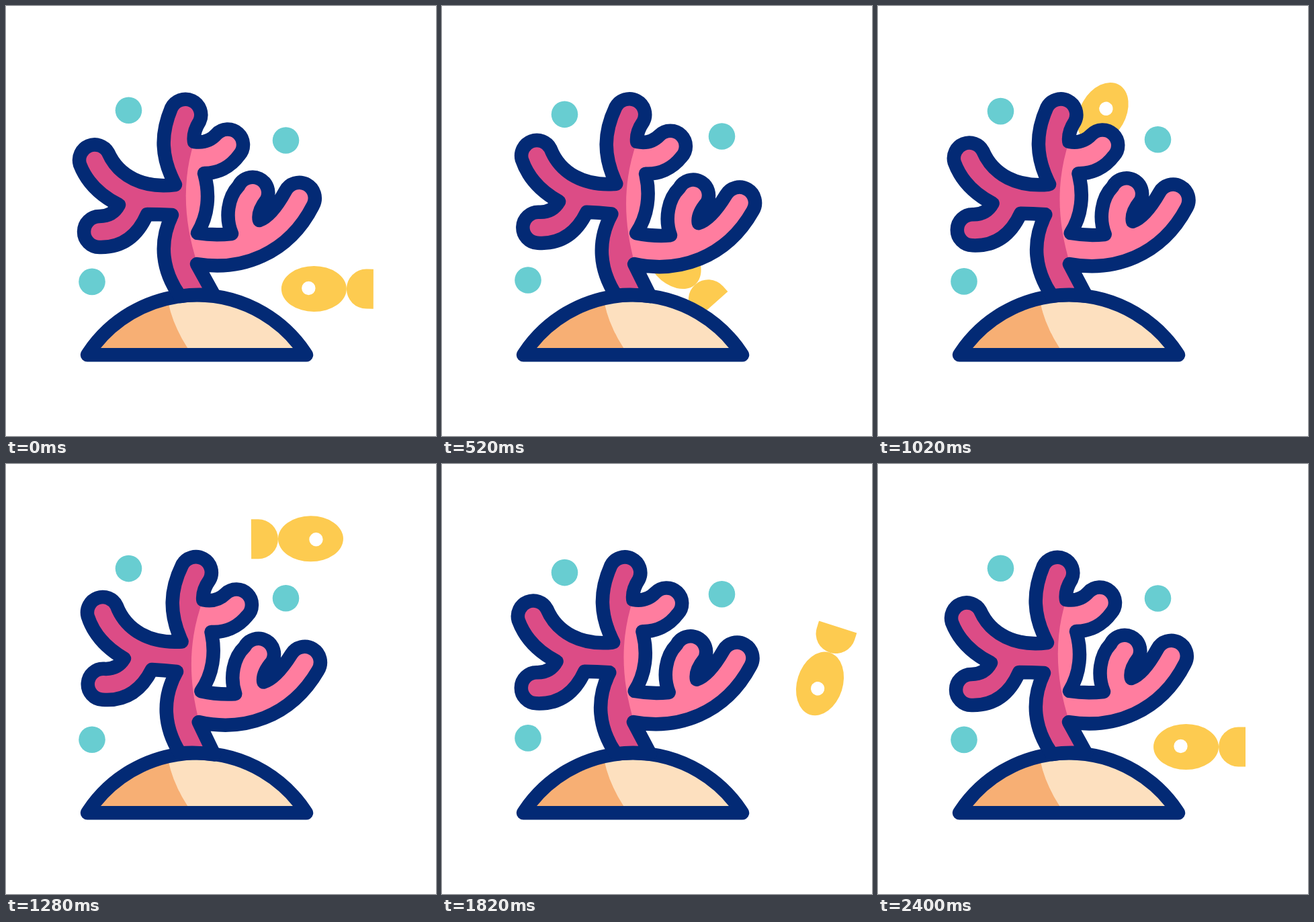
An HTML page for the animation above (2420 ms loop, 640 by 640 pixels).

```html
<!DOCTYPE html>
<html lang="en">
<head>
<meta charset="utf-8">
<title>Coral reef</title>
<style>
  html, body { margin: 0; width: 100%; height: 100%; overflow: hidden; background: #fff; }
  svg { display: block; width: 100vw; height: 100vh; }
  .line { fill: none; stroke: #032a75; stroke-width: 20.5; stroke-linejoin: round; stroke-linecap: round; }
</style>
</head>
<body>
<svg viewBox="0 0 640 640">
  <defs>
    <path id="coralShape" d="M259 432
      C232 394 227 352 247 311 Q228 310 210 310
      C197 340 175 360 139 359 A23 23 0 0 1 139 313 Q159 313 168 296
      C140 282 120 262 110 236 A23 23 0 0 1 152 218
      C168 254 205 272 252 266
      C230 225 230 190 246 152 A23 23 0 0 1 288 172 Q278 188 280 202
      C293 204 304 201 313 191 A23 23 0 0 1 347 222
      C334 240 315 249 295 249
      C304 280 301 312 285 338 Q310 342 336 339
      C326 315 330 285 346 268 A23 23 0 0 1 388 288 Q374 306 377 319
      C392 314 405 295 416 275 A23 23 0 0 1 457 297
      C420 370 350 395 284 384 L310 431
      A194 194 0 0 0 259 432 Z"/>
    <path id="duneShape" d="M121 519.3 A193.8 193.8 0 0 1 447 519.3 Z"/>
    <clipPath id="coralShade">
      <path d="M280 202 L310 150 V100 H80 V445 H330 L285 384 C264 320 262 260 280 202 Z"/>
    </clipPath>
    <clipPath id="duneShade">
      <path d="M239 425 Q244 473 277 519 H100 V425 Z"/>
    </clipPath>
  </defs>

  <g id="fish" fill="#fdcb50">
    <ellipse rx="48.5" ry="34"/>
    <path d="M88.5 -29.5 H78 A29.5 29.5 0 0 0 78 29.5 H88.5 Z"/>
    <circle cx="-8" cy="-1" r="10.2" fill="#fff"/>
  </g>

  <use href="#duneShape" fill="#fde0bf"/>
  <use href="#duneShape" fill="#f7af74" clip-path="url(#duneShade)"/>
  <use href="#duneShape" class="line"/>

  <g id="coral">
    <use href="#coralShape" fill="#ff7d9f"/>
    <g clip-path="url(#coralShade)"><use href="#coralShape" fill="#dc4c86"/></g>
    <use href="#coralShape" class="line"/>
  </g>

  <g fill="#68cdd1">
    <circle class="bubble" data-drift="6.3" cx="182.5" cy="155.3" r="19.8"/>
    <circle class="bubble" data-drift="-6.3" cx="416.5" cy="200" r="19.8"/>
    <circle class="bubble" data-drift="-2.5" cx="128" cy="410.4" r="19.8"/>
  </g>
</svg>
<script>
const LOOP = 2420, SPAN = 2400;
const fish = document.getElementById('fish');
const coral = document.getElementById('coral');
const bubbles = document.querySelectorAll('.bubble');

// Evenly timed stops of the swim: x, y, turn
const stops = [
  [458.5, 421, 0], [404.3, 413.6, 29], [325.2, 355.5, 56.5], [308, 220.5, 98.3],
  [410.3, 108.9, 159], [552.4, 182.7, 234], [565.6, 318.3, 284.5], [511.2, 409.9, 328]
];
const n = stops.length;

// Periodic interpolation kernel: 1 at its own stop, 0 at all others
function kernel(u) {
  const s = Math.sin(Math.PI * u);
  return Math.abs(s) < 1e-6 ? 1 : Math.sin(n * Math.PI * u) * Math.cos(Math.PI * u) / (n * s);
}

function swim(u) {
  const pose = [0, 0, 360 * u];
  stops.forEach(([x, y, turn], i) => {
    const k = kernel(u - i / n);
    pose[0] += k * x;
    pose[1] += k * y;
    pose[2] += k * (turn - 360 * i / n);
  });
  return pose.map(v => v.toFixed(2));
}

// Smooth swing between 0 and 1, there and back
const swing = u => (1 - Math.cos(Math.PI * u)) / 2;

function sway(t) {
  const low = t < 400 || t > SPAN - 400 ? 0 : -3;
  return low + (4 - low) * swing(t / 400);
}

function draw(now) {
  const t = Math.min(now % LOOP, SPAN);
  const [x, y, turn] = swim(t / SPAN);
  fish.setAttribute('transform', `translate(${x} ${y}) rotate(${turn})`);
  coral.setAttribute('transform', `rotate(${sway(t).toFixed(3)} 284 431)`);
  for (const b of bubbles)
    b.setAttribute('transform', `translate(0 ${(b.dataset.drift * swing(t / 600)).toFixed(2)})`);
}

const start = performance.now();
function tick() {
  draw(performance.now() - start);
  requestAnimationFrame(tick);
}
draw(0);
requestAnimationFrame(tick);
</script>
</body>
</html>
```
